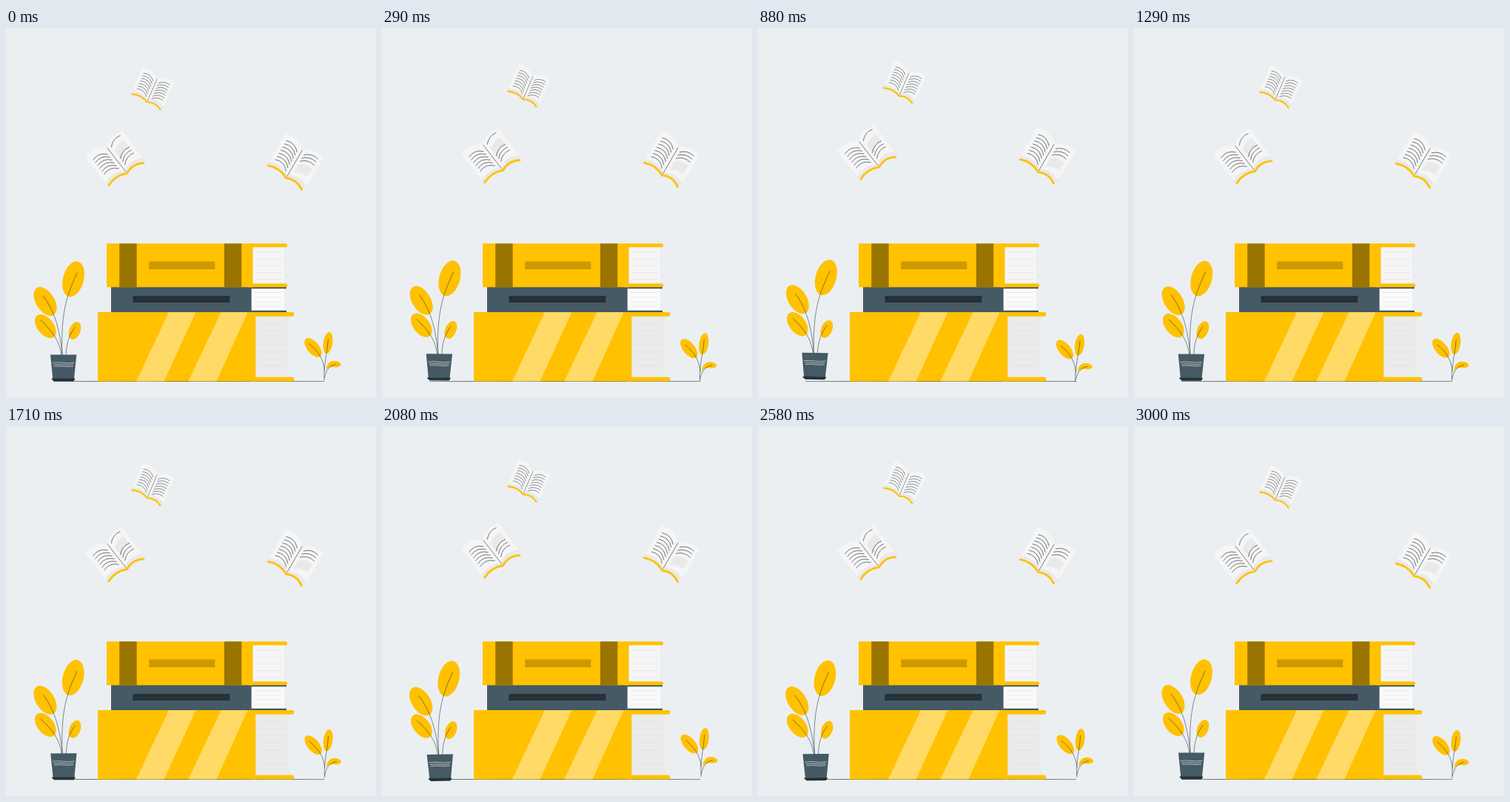
Animation, 500 px wide and 500 px high, one loop 3.04 s. Source, as an HTML page:

```html
<!DOCTYPE html>
<html lang="en">
<head>
<meta charset="utf-8">
<title>Floating books</title>
<style>
  html, body { margin: 0; width: 100%; height: 100%; overflow: hidden; background: #ebeff2; }
  svg { display: block; width: 100%; height: 100%; }
  .gold { fill: #ffc100; }
  .slate { fill: #455a64; }
  .ink { fill: #263238; }
  .shade { fill: #997400; }
  .glare { fill: #fff; opacity: .4; }
  .stem, .text { fill: none; stroke: #263238; stroke-linecap: round; }
  .stem { stroke-width: .55; }
  .text { stroke-width: .6; }
  .rule { fill: none; stroke: #e0e0e0; stroke-width: .6; }
  .cover { fill: none; stroke: #ffc100; stroke-width: 2.8; stroke-linecap: round; }
</style>
</head>
<body>
<svg viewBox="0 0 500 500">
  <path class="ink" d="M64 477.300L246 477.100L430 477.300V477.700L246 477.900L64 477.700Z"/>

  <!-- bottom book -->
  <path fill="#ebebeb" d="M337 389H383V473H337Z"/>
  <g id="bottomRules" class="rule"></g>
  <g class="gold">
    <path d="M124 384H337.300V477.500H124Z"/>
    <rect x="330" y="384" width="59.300" height="5.800" rx="2.300"/>
    <rect x="330" y="471.700" width="59.300" height="5.800" rx="2.300"/>
  </g>
  <path class="glare" d="M220 384H256.500L213.500 477.500H176ZM290.700 384H326.700L284.300 477.500H246.300Z"/>

  <!-- middle book -->
  <path fill="#fafafa" d="M331 352H376V382H331Z"/>
  <g id="middleRules" class="rule"></g>
  <path class="slate" d="M142 350H379V352.300H331.700V381.700H379V384H142Z"/>
  <path class="ink" d="M171.500 362H302.500V371H171.500Z"/>

  <!-- top book -->
  <path fill="#ebebeb" d="M333 295H379V347H333Z"/>
  <path fill="#f5f5f5" d="M334 296H376.500V345.500H334Z"/>
  <g id="topRules" class="rule"></g>
  <g class="gold">
    <path d="M136 291.300H333.500V350.200H136Z"/>
    <rect x="326" y="291.300" width="54" height="5" rx="2"/>
    <rect x="326" y="345.200" width="54" height="5" rx="2"/>
  </g>
  <path class="shade" d="M153.300 291.300H176.700V350.200H153.300ZM295 291.300H318.300V350.200H295Z"/>
  <path fill="#cc9a00" d="M193.300 315.500H282.300V326H193.300Z"/>

  <g id="plants">
    <g id="leaves" class="gold"></g>
    <path class="gold" d="M432.500 462Q434 450 444 449.800Q451 450.300 453 455Q450 459.500 442 458Q436 458 432.500 462Z"/>
    <g class="stem">
      <path d="M96 331C86 354 73 378 76 442"/>
      <path d="M50 362C65 381 73 407 76 442"/>
      <path d="M47 395C63 410 72 422 75 442"/>
      <path d="M93.500 404C85 415 82 425 81 442"/>
      <path d="M435.500 420C434 440 429 455 430 476"/>
      <path d="M410 427C422 437 429 447 430.500 463"/>
      <path d="M446 454.500C437 456 432 463 430.500 473"/>
    </g>
    <path class="slate" d="M60 441.500H95.300L92 474H63.200Z"/>
    <path class="ink" d="M62.500 473.500H92Q94 473.500 93 475L91 477.500H65L62 475Q60.800 473.500 62.500 473.500Z"/>
    <path d="M62.500 452.500Q69 451.300 77 452.400T92.500 452.200M64 455Q72 454.200 79 455T91 454.700M65 457.300Q72 456.400 79 457.300T91 457"
      fill="none" stroke="#e0e0e0" stroke-width=".7"/>
  </g>

  <g id="books"></g>
</svg>
<script>
  const LOOP = 3040, FPS = 24;
  const get = id => document.getElementById(id);
  const path = (cls, d) => `<path class="${cls}" d="${d}"/>`;
  const repeat = (n, make) => Array.from({ length: n }, (_, i) => make(i)).join('');

  const rules = (id, x1, x2, y, gap, n) => {
    get(id).innerHTML = repeat(n, i => path('', `M${x1} ${y + i * gap}H${x2}`));
  };
  rules('topRules', 336, 373, 303, 9.2, 5);
  rules('middleRules', 336, 373, 357.5, 6.2, 4);
  rules('bottomRules', 341, 379, 400, 9.4, 7);

  // centre x, centre y, radius x, radius y, tilt
  get('leaves').innerHTML = [
    [91, 339.3, 14, 24.5, 15], [53, 369.5, 12.5, 21.5, -32],
    [53.3, 403, 11, 18.5, -38], [93, 409, 7.5, 12.5, 22],
    [415, 432, 8, 15.5, -40], [435, 425.5, 6.3, 14.7, 8]
  ].map(([x, y, rx, ry, tilt]) =>
    `<ellipse rx="${rx}" ry="${ry}" transform="translate(${x} ${y}) rotate(${tilt})"/>`).join('');

  const leftLines = (n, y) => repeat(n, i => path('text', `M-25 ${y + i * 4.9}q12 -4 20 6`));
  const rightLines = (n, y) => repeat(n, i => path('text', `M5 ${y + i * 4.9}q8 -8 19 -5`));
  const picture = y => `<path fill="#e9e9e9" d="M5 ${y}q8 -7 19 -5v13q-11 -2 -19 5z"/>`;

  // origin is the foot of the spine
  const book = (x, y, tilt, scale, print) => `
    <g transform="translate(${x} ${y}) rotate(${tilt}) scale(${scale})">
      <path fill="#e9e9ea" d="M-31 -8L-31 -3Q-14 -8 0 0Q14 -6 28 3L29 -5L0 -14Z"/>
      <path fill="#f5f5f5" d="M-31 -51Q-10 -56 0 -42Q10 -54 30 -48L29 -3Q12 -12 0 -3Q-12 -13 -31 -7Z"/>
      ${path('cover', 'M-29.500 -1.500Q-14 -7 0 1Q14 -5 26 4')}
      ${path('stem', 'M0 -42V-2')}
      ${print}
    </g>`;

  get('books').innerHTML =
    book(191, 99.5, 23, .78, leftLines(7, -43) + rightLines(7, -37)) +
    book(163, 195.5, -38, 1, leftLines(6, -41.5) + rightLines(1, -40) + picture(-32) + rightLines(3, -20)) +
    book(379, 202, 30, 1, leftLines(7, -43) + rightLines(3, -38) + picture(-23));

  // triangle wave: 0 at phase 0, 1 at half a turn
  const wave = phase => 1 - Math.abs(1 - 2 * (phase - Math.floor(phase)));

  function draw(ms) {
    const slot = Math.floor(ms / 10) * 10 + 4.9;
    const t = Math.floor(slot * FPS / 1000) / FPS;
    const lift = -10 * wave(t / 1.5);
    const sway = 2 * wave(t / 3 + .25) - 1;
    get('books').setAttribute('transform', `translate(0 ${lift})`);
    get('plants').setAttribute('transform', `rotate(${sway} 245 397)`);
  }

  const start = performance.now();
  function tick() {
    draw((performance.now() - start) % LOOP);
    requestAnimationFrame(tick);
  }
  tick();
</script>
</body>
</html>
```
